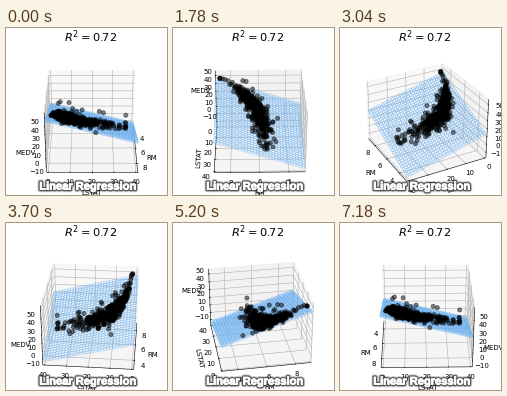
Recreate the animation shown at these times as a matplotlib script. Size 161 by 167 pixels, loop 7.2 s.

```python
import numpy as np
import matplotlib.pyplot as plt
from matplotlib.animation import FuncAnimation
from matplotlib.collections import LineCollection, PolyCollection
from matplotlib.patheffects import Stroke, Normal

W, H, DPI = 161, 167, 50
FRAMES = 360

# Axis order: RM, LSTAT, MEDV
LOW = np.array([2.875, -0.83, -17.0])
HIGH = np.array([9.125, 40.83, 56.5])
SIZE = np.array([1.19, 1.19, 0.893])
TICKS = [(4, 6, 8), range(0, 41, 10), range(-10, 51, 10)]
NAMES = ["RM", "LSTAT", "MEDV"]

ELEV = np.radians(30)
DIST, SCALE = 10, 745
CX, CY = 86, 91.75
TICK_PAD = SIZE * 0.092
NAME_PAD = SIZE * [0.2, 0.2, 0.175]


def to_box(p):
    """Data coordinates to box coordinates centred on the origin."""
    return ((np.asarray(p, float) - LOW) / (HIGH - LOW) - 0.5) * SIZE


def project(p, azim):
    """Box coordinates to stage pixels, seen from the given azimuth."""
    p = np.asarray(p, float)
    x, y, z = p[..., 0], p[..., 1], p[..., 2]
    front = x * np.cos(azim) + y * np.sin(azim)
    right = y * np.cos(azim) - x * np.sin(azim)
    up = z * np.cos(ELEV) - front * np.sin(ELEV)
    depth = DIST - front * np.cos(ELEV) - z * np.sin(ELEV)
    return np.stack([CX + SCALE * right / depth, CY - SCALE * up / depth], -1)


def make_points(n=506):
    rng = np.random.default_rng(4)
    u = rng.normal(size=n)
    lstat = np.clip(np.exp(2.37 + 0.55 * u), 1.73, 36)
    rm = 5.45 + 0.7 * np.exp(-0.55 * u) + 0.27 * rng.standard_t(5, n)
    rm = np.clip(rm, 3.56, 8.78)
    medv = 43.5 - 9 * np.log(lstat) + 6 * (rm - 6.2)
    medv += 2.8 * rng.normal(size=n)
    lucky = rng.random(n) < 0.02
    medv = np.where(lucky, medv + 15, medv)
    return np.stack([rm, lstat, np.clip(medv, 5, 50)], -1)


def make_plane(n=30):
    rm, lstat = np.meshgrid(np.linspace(3, 9, n), np.linspace(0, 40, n))
    medv = 13.5 + 5.35 * (rm - 3) - 0.637 * lstat
    return np.stack([rm.ravel(), lstat.ravel(), medv.ravel()], -1)


points, plane = to_box(make_points()), to_box(make_plane())
ticks = [[to_box([t] * 3)[k] for t in TICKS[k]] for k in range(3)]

plt.rcParams["font.family"] = "DejaVu Sans"
fig = plt.figure(figsize=(W / DPI, H / DPI), dpi=DPI, facecolor="white")
ax = fig.add_axes([0, 0, 1, 1])
ax.set(xlim=(0, W), ylim=(H, 0))
ax.axis("off")

shades = [(s, s, s, 0.5) for s in (0.95, 0.9, 0.925)]
panes = PolyCollection([], facecolors=shades, edgecolors=shades, lw=1, zorder=1)
grid = LineCollection([], colors="#b0b0b0", lw=0.8, zorder=2)
edges = LineCollection([], colors="black", lw=0.8, zorder=3)
for part in (panes, grid, edges):
    ax.add_collection(part, autolim=False)


def make_dots(n, size, width, zorder, **style):
    dots = ax.scatter(np.zeros(n), np.zeros(n), s=size, zorder=zorder, **style)
    dots.set_linewidth([width, width])  # a pair keeps sub-pixel positions
    return dots


mesh = make_dots(len(plane), 16, 0.9, 4, facecolors="none",
                 edgecolors="#70b3f0", alpha=0.62)
cloud = make_dots(len(points), 36, 1.0, 5, facecolors="black",
                  edgecolors="black", alpha=0.5)


def make_label(text):
    return ax.text(0, 0, text, fontsize=10, ha="center", va="center",
                   rotation_mode="anchor", zorder=6)


tick_labels = [[make_label(str(t).replace("-", "\u2212")) for t in row]
               for row in TICKS]
name_labels = [make_label(name) for name in NAMES]

ax.text(84.5, 13.4, "$R^2 = 0.72$", fontsize=16.4, ha="center",
        va="baseline", zorder=7)

halo = [Stroke(linewidth=w, foreground="#222222", alpha=a)
        for w, a in ((8, 0.1), (6.5, 0.2), (5, 0.35), (3.6, 0.6))]
ax.text(82, 161.6, "Linear Regression", fontsize=16, color="white",
        family="Liberation Sans", weight="bold", ha="center", va="baseline",
        zorder=8,
        path_effects=halo + [Stroke(linewidth=1.2, foreground="white"),
                             Normal()])


def moved(p, k, value):
    q = np.array(p, float)
    q[k] = value
    return q


def text_angle(start, end):
    """Angle of a screen line, kept readable from left to right."""
    dx, dy = end - start
    angle = np.degrees(np.arctan2(-dy, dx)) % 180
    return angle - 180 if angle > 90 else angle


def update(i):
    azim = np.radians(i)
    far = SIZE / 2 * [-1 if np.cos(azim) >= 0 else 1,
                      -1 if np.sin(azim) >= 0 else 1, -1]
    quads, lines, strokes = [], [], []

    for k in range(3):
        # The axis runs along the edge where one neighbour side is near.
        near = 1 if k == 0 else 0
        other = 3 - k - near
        corner = moved(far, near, -far[near])
        quads.append([far, corner, moved(corner, other, -far[other]),
                      moved(far, other, -far[other])])

        axis = [corner, moved(corner, k, -far[k])]
        strokes.append(axis)
        out = moved(np.sign(corner), k, 0)
        tip = moved(np.zeros(3), near, out[near] * 0.0095)

        for t, label in zip(ticks[k], tick_labels[k]):
            at, back = moved(corner, k, t), moved(far, k, t)
            lines.append([at, back, moved(back, other, -far[other])])
            strokes.append([at + tip, at - 2 * tip])
            label.set_position(project(at + out * TICK_PAD, azim))

        middle = moved(corner, k, 0) + out * NAME_PAD
        name_labels[k].set_position(project(middle, azim))
        if len(NAMES[k]) > 4:
            name_labels[k].set_rotation(text_angle(*project(axis, azim)))

    panes.set_verts(project(quads, azim))
    grid.set_segments(project(lines, azim))
    edges.set_segments(project(strokes, azim))
    mesh.set_offsets(project(plane, azim))
    cloud.set_offsets(project(points, azim))
    return []


anim = FuncAnimation(fig, update, frames=FRAMES, interval=20, repeat=True)
plt.show()
```
